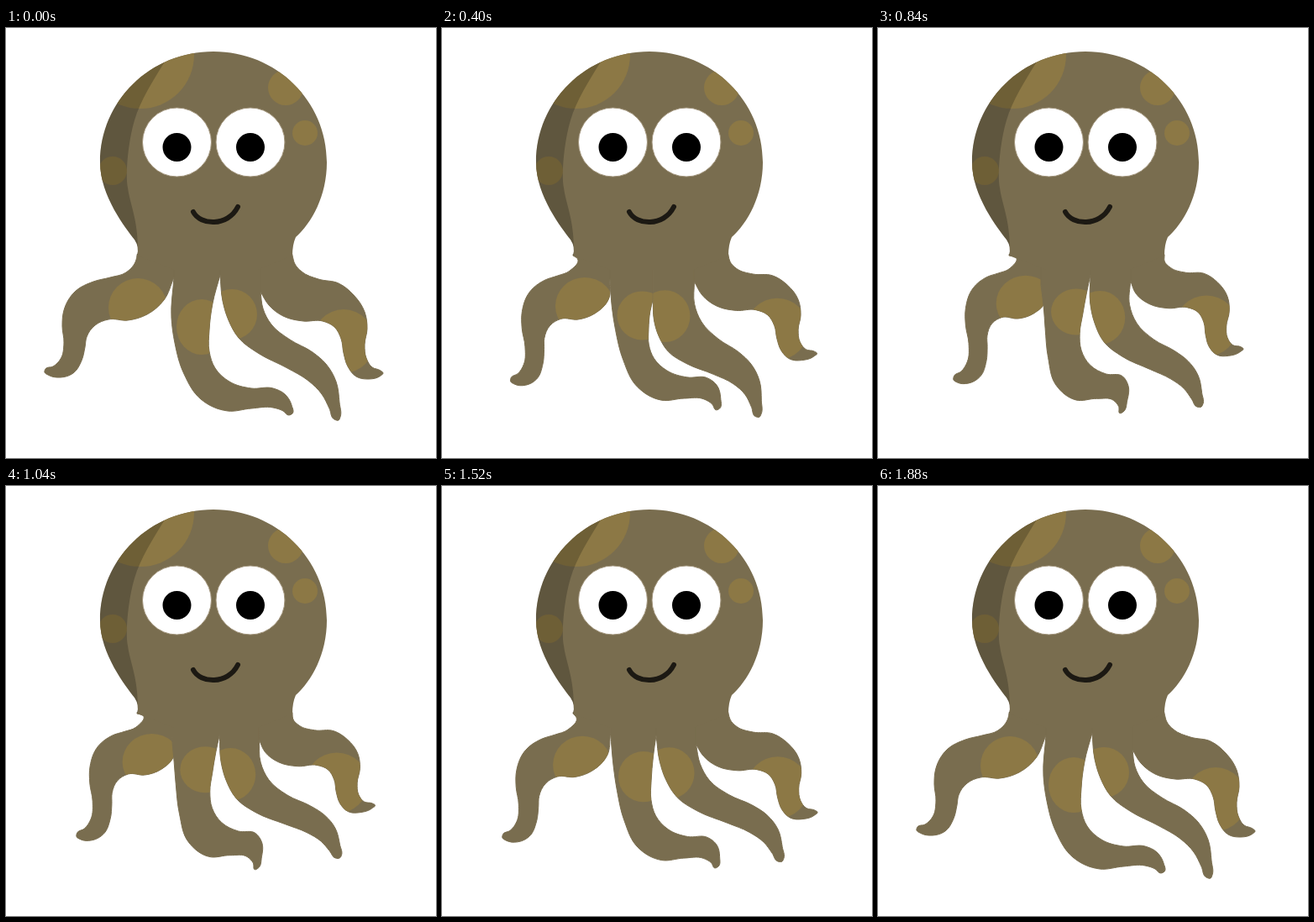
These frames come from a looping animation (512 px wide and 512 px high, 1.92 s). An HTML page with a canvas:

```html
<!DOCTYPE html>
<html lang="en">
<head>
<meta charset="utf-8">
<title>Octopus</title>
<style>
html, body { margin: 0; height: 100%; overflow: hidden; background: #fff; }
canvas { display: block; width: 512px; height: 512px; }
</style>
</head>
<body>
<canvas id="stage" width="512" height="512"></canvas>
<script>
const ctx = document.getElementById('stage').getContext('2d');
const BODY = '#796d4f', SPOT = '#8c7845';
const LOOP = 1920, STEP = 40, END = LOOP - STEP;

const points = text => text.split(' ').map(p => p.split(',').map(Number));

// Where neighbouring arms meet, from neck to neck. Keys: time, dx, dy.
const joints = [
  { at: [156, 271], keys: [] },
  { at: [200, 297], keys: [[560, 0, 3], [840, -6, 9], [1240, 1, -4]] },
  { at: [255, 294], keys: [[240, -1, 21], [560, -6, 33], [840, -2, 0], [1240, 0, 4]] },
  { at: [303, 314], keys: [[560, -3, -14], [1240, -1, -10]] },
  { at: [341, 271], keys: [] }
];

// Resting outline, spot (x, y, rx, ry) and sway keys: time, bend x and y, tip x and y.
const arms = [
  {
    outline: points('155,276 143,291 124,297 104,302 82,314 69,336 67,355 69,375 65,394 56,403 47,406 ' +
      '46,410 50,413 65,416 80,411 90,396 94,380 96,368 106,354 122,347 145,348 168,341 188,324'),
    spot: [157, 333, 35, 35],
    sway: [[240, 16, -4, 19, 7], [560, 30, -10, 46, 13], [840, 36, -14, 44, 9],
      [1240, 26, -10, 31, 7], [1520, 19, -4, 26, 9]]
  },
  {
    outline: points('197,345 201,375 212,412 232,442 264,456 292,453 318,452 330,456 337,461 ' +
      '341,459 340,449 332,436 318,429 292,429 266,421 249,405 242,385 242,360 246,328'),
    spot: [233, 356, 30, 33],
    sway: [[240, 10, -20, -3, -6], [560, 18, -38, -22, -6], [840, 18, -42, -49, -2],
      [1240, 20, -42, -27, -6], [1520, 19, -22, -12, -6]]
  },
  {
    outline: points('258,325 265,348 277,369 300,387 335,405 360,420 376,436 385,453 391,466 ' +
      '396,467 398,463 397,446 393,421 381,400 365,386 338,371 316,353 306,334'),
    spot: [269, 341, 30, 30],
    sway: [[560, -12, 10, -21, -6], [840, -14, 14, -11, -16], [1240, 3, 7, 10, -29], [1520, 4, 5, 9, -20]]
  },
  {
    outline: points('313,330 330,343 354,349 377,349 391,356 399,370 402,387 407,403 417,415 431,418 446,414 ' +
      '449,411 446,408 436,404 429,393 427,377 430,358 427,338 414,318 396,304 372,299 352,290 344,281'),
    spot: [402, 373, 37, 38],
    sway: [[560, -6, -12, -4, -28], [840, -11, -13, -14, -29], [1240, -6, -14, -4, -32]]
  }
];

const head = new Path2D('M112 160C112 87 172 28 247 28S382 87 382 160' +
  'C382 200 364 232 345 249Q341 258 341 271L300 288H200L156 271Q159 261 153 252C143 239 112 200 112 160Z');
const shade = new Path2D('M191 37C175 63 160 86 153 110C145 137 142 176 145 190' +
  'C148 212 158 229 157 270L90 270V20Z');
const smile = new Path2D('M223 219C231 235 264 237 276 213');

// Smooth monotone track through the keys, at rest at both ends of the loop.
function track(keys, t) {
  const rows = [[0, 0, 0, 0, 0], ...keys, [END, 0, 0, 0, 0]];
  const last = rows.length - 1;
  let k = 0;
  while (k < last - 1 && t >= rows[k + 1][0]) k++;
  const span = rows[k + 1][0] - rows[k][0];
  const s = Math.min(1, (t - rows[k][0]) / span);
  return rows[0].map((_, j) => {
    const secant = i => (rows[i + 1][j] - rows[i][j]) / (rows[i + 1][0] - rows[i][0]);
    const slope = i => {
      const a = secant(Math.max(0, i - 1)), b = secant(Math.min(last - 1, i));
      return a * b > 0 ? 2 * a * b / (a + b) : 0;
    };
    const ease = s * s * (3 - 2 * s);
    return rows[k][j] + (rows[k + 1][j] - rows[k][j]) * ease +
      span * s * (1 - s) * (slope(k) * (1 - s) - slope(k + 1) * s);
  }).slice(1);
}

const distance = (a, b) => Math.hypot(b[0] - a[0], b[1] - a[1]);

// Smooth curve whose tangents follow the circle through each three points.
function curve(path, pts) {
  const segs = pts.slice(1).map((p, i) => {
    const len = distance(pts[i], p);
    return { x: (p[0] - pts[i][0]) / len, y: (p[1] - pts[i][1]) / len, len };
  });
  const tangent = i => {
    const a = segs[i - 1] || segs[i], b = segs[i] || a;
    const x = a.x * b.len + b.x * a.len, y = a.y * b.len + b.y * a.len;
    const len = Math.hypot(x, y) || 1;
    return [x / len, y / len];
  };
  path.lineTo(...pts[0]);
  segs.forEach((seg, i) => {
    const p = pts[i], q = pts[i + 1], r = seg.len * 0.35;
    const a = tangent(i), b = tangent(i + 1);
    path.bezierCurveTo(p[0] + a[0] * r, p[1] + a[1] * r, q[0] - b[0] * r, q[1] - b[1] * r, ...q);
  });
}

function oval(x, y, rx, ry, fill) {
  ctx.beginPath();
  ctx.ellipse(x, y, rx, ry, 0, 0, 7);
  ctx.fillStyle = fill;
  ctx.fill();
}

function clipped(path, paint) {
  ctx.save();
  ctx.clip(path);
  paint();
  ctx.restore();
}

function drawArm(arm, i, t) {
  const [from, to] = [joints[i], joints[i + 1]];
  const root = [0, 1].map(k => (from.at[k] + to.at[k]) / 2);
  const reach = Math.max(...arm.outline.map(p => distance(root, p)));
  const tip = arm.outline.findIndex(p => distance(root, p) === reach);
  const sway = track(arm.sway, t);
  const shifts = [from, to].map(joint => track(joint.keys, t));

  // The push grows from the root through the bend to the tip.
  const warp = (p, shift) => {
    const u = distance(root, p) / reach, v = 1 - u;
    return [0, 1].map(k => p[k] + shift[k] * v * v + sway[k] * 2 * u * v + sway[k + 2] * u * u);
  };
  const [start, end] = [from, to].map((joint, n) => joint.at.map((c, k) => c + shifts[n][k]));

  const path = new Path2D();
  path.moveTo(start[0], 270);
  curve(path, [start, ...arm.outline.map((p, n) => warp(p, shifts[n > tip ? 1 : 0])), end]);
  path.lineTo(end[0], 270);
  path.closePath();

  ctx.fillStyle = ctx.strokeStyle = BODY;
  ctx.lineWidth = 1;
  ctx.fill(path);
  ctx.stroke(path);
  const [x, y, rx, ry] = arm.spot;
  clipped(path, () => oval(...warp([x, y], [0, 0]), rx, ry + sway[1] * 0.13, SPOT));
}

function drawHead() {
  ctx.fillStyle = BODY;
  ctx.fill(head);
  clipped(head, () => {
    for (const [x, y, r] of [[160, 32, 64], [333, 71, 21], [356, 125, 15], [127, 170, 17]])
      oval(x, y, r, r, SPOT);
    ctx.fillStyle = 'rgba(0,0,0,.21)';
    ctx.fill(shade);
  });
  for (const x of [203.5, 291]) {
    oval(x, 136, 41, 41, '#fff');
    ctx.strokeStyle = '#a0937a';
    ctx.lineWidth = 1;
    ctx.stroke();
    oval(x, 142, 17, 17, '#000');
  }
  ctx.strokeStyle = '#1c1913';
  ctx.lineWidth = 6;
  ctx.stroke(smile);
}

function draw() {
  const t = Math.floor(performance.now() % LOOP / STEP) * STEP;
  ctx.clearRect(0, 0, 512, 512);
  ctx.lineCap = ctx.lineJoin = 'round';
  arms.forEach((arm, i) => drawArm(arm, i, t));
  drawHead();
  requestAnimationFrame(draw);
}
draw();
</script>
</body>
</html>
```
